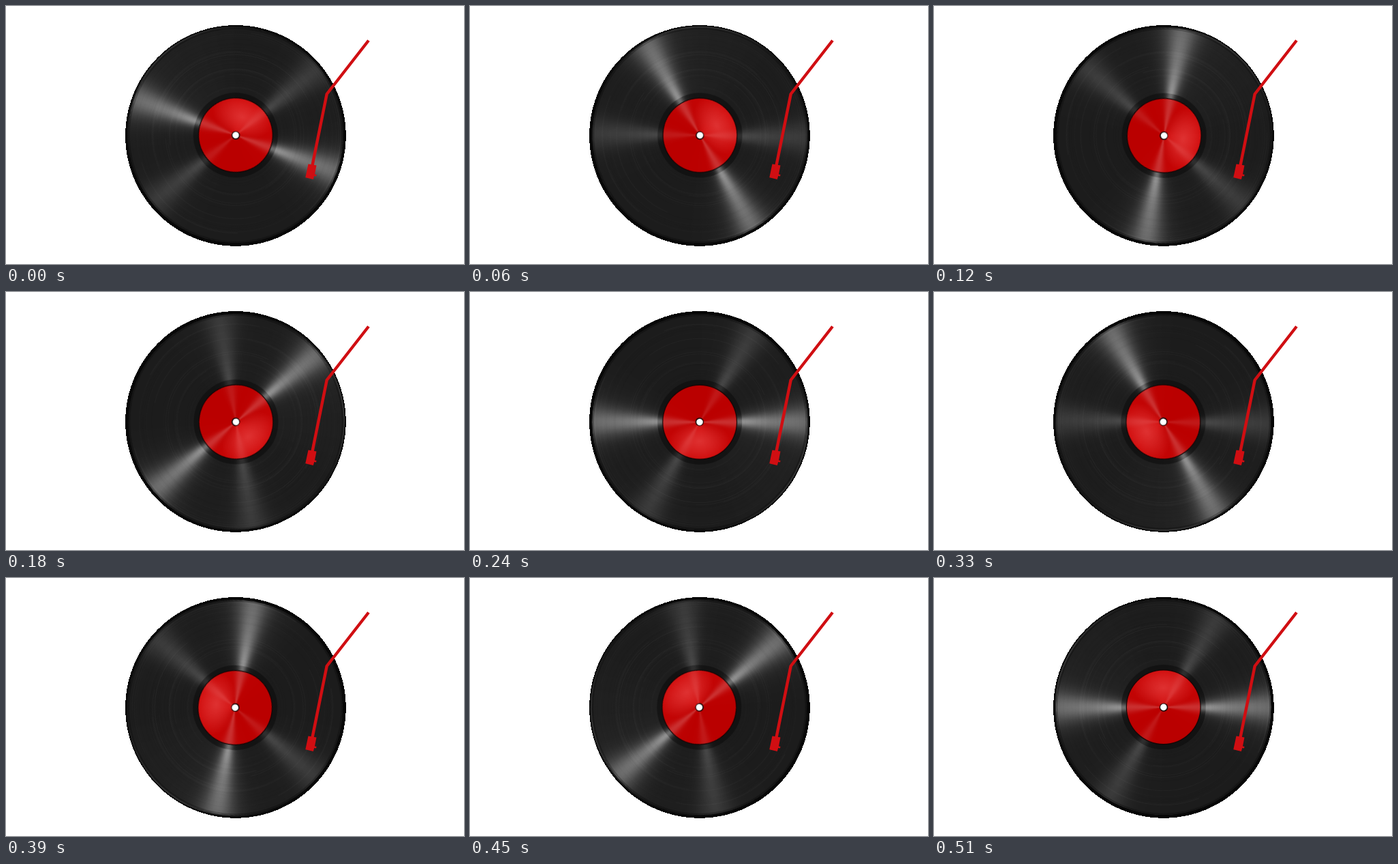
Recreate the animation shown at these times as an HTML page with a canvas. Size 672 px wide and 378 px high, loop 0.54 s.

```html
<!DOCTYPE html>
<html lang="en">
<head>
<meta charset="utf-8">
<title>Spinning record</title>
<style>
  html, body { margin: 0; width: 100%; height: 100%; overflow: hidden; background: #fff; }
  canvas { display: block; width: 672px; height: 378px; }
</style>
</head>
<body>
<canvas id="stage" width="672" height="378"></canvas>
<script>
const W = 672, H = 378, CX = 336.9, CY = 189.9;
const STEP = 30, STEPS = 18;
const ctx = document.getElementById('stage').getContext('2d');
const TAU = Math.PI * 2;

// Angular falloff around c degrees, repeating every period
function glow(a, c, s, period = 180) {
  const d = ((a - c) % period + period * 1.5) % period - period / 2;
  return Math.exp(-(d * d) / (s * s));
}

function conic(g, x, y, color) {
  const grad = g.createConicGradient(0, x, y);
  for (let a = 0; a <= 360; a += 2) grad.addColorStop(a / 360, color(a));
  return grad;
}

function radial(g, x, y, r, stops) {
  const grad = g.createRadialGradient(x, y, 0, x, y, r);
  for (const [p, c] of stops) grad.addColorStop(p, c);
  return grad;
}

function disc(g, x, y, r, fill) {
  g.fillStyle = fill;
  g.beginPath();
  g.arc(x, y, r, 0, TAU);
  g.fill();
}

// Disc with a crisp, stepped edge
function hardDisc(g, x, y, r, fill) {
  g.fillStyle = fill;
  for (let row = Math.floor(y - r); row <= y + r; row++) {
    const half = Math.sqrt(Math.max(0, r * r - (row + .5 - y) ** 2));
    const left = Math.round(x - half);
    g.fillRect(left, row, Math.round(x + half) - left, 1);
  }
}

function ring(g, x, y, r, width, stroke, from = 0, to = TAU) {
  g.strokeStyle = stroke;
  g.lineWidth = width;
  g.beginPath();
  g.arc(x, y, r, from, to);
  g.stroke();
}

function layer() {
  const c = document.createElement('canvas');
  c.width = c.height = 340;
  const g = c.getContext('2d');
  g.translate(170, 170);
  return [c, g];
}

function seeded(seed) {
  return () => (seed = (seed * 16807) % 2147483647) / 2147483647;
}

const vinyl = a => {
  const v = 28 + 64 * glow(a, 0, 9) + 12 * glow(a, 0, 20)
    + 24 * glow(a, -59, 9) + 5 * glow(a, -59, 20) + 4 * glow(a, 215, 35, 360);
  return `rgb(${v},${v},${v})`;
};

const red = a => {
  const top = glow(a, -88, 70, 360);
  const gb = 10 * top + 46 * glow(a, 0, 9) + 24 * glow(a, -59, 9);
  return `rgb(${186 + 20 * top + gb * .25},${gb},${gb})`;
};

function makeShine() {
  const [c, g] = layer();
  disc(g, 0, 0, 157, conic(g, 0, 0, a =>
    `rgba(255,255,255,${.28 * glow(a, 0, 5) + .07 * glow(a, -59, 6)})`));
  g.globalCompositeOperation = 'destination-in';
  disc(g, 0, 0, 168, radial(g, 0, 0, 160, [
    [0, 'rgba(0,0,0,0)'], [.34, '#000'], [.42, '#000'],
    [.62, 'rgba(0,0,0,.45)'], [.9, 'rgba(0,0,0,.15)'], [1, 'rgba(0,0,0,0)']]));
  return c;
}

function makeRecord() {
  const [c, g] = layer();
  const rnd = seeded(77);
  const ox = -.2, oy = -.7;

  disc(g, 0, 0, 160.5, '#060606');
  disc(g, ox, oy, 158, conic(g, ox, oy, vinyl));
  ring(g, ox, oy, 58, 8, 'rgba(8,8,8,.5)');
  g.drawImage(makeShine(), -170, -170);

  // Grooves
  for (let r = 64; r < 156; r += 1.5) {
    const tone = rnd() < .6 ? '0,0,0' : '255,255,255';
    const from = rnd() * TAU;
    ring(g, ox, oy, r, .8, `rgba(${tone},${.01 + rnd() * .045})`, from, from + 1 + rnd() * 3);
  }
  ring(g, ox, oy, 156.4, 1.6, 'rgba(0,0,0,.3)');
  ring(g, ox, oy, 158.8, 1.6, conic(g, ox, oy, a => {
    const v = 8 + 50 * glow(a, 210, 38, 360);
    return `rgb(${v},${v},${v})`;
  }));

  // Label
  disc(g, ox, oy, 55, '#140404');
  disc(g, ox, oy, 53.8, conic(g, ox, oy, red));
  g.save();
  g.beginPath();
  g.arc(ox, oy, 53.8, 0, TAU);
  g.clip();
  g.translate(0, -29);
  g.scale(1.5, 1);
  disc(g, 0, 0, 30, radial(g, 0, 0, 30, [
    [0, 'rgba(255,140,140,.3)'], [.5, 'rgba(255,140,140,.16)'], [1, 'rgba(255,140,140,0)']]));
  g.restore();

  // Spindle hole
  disc(g, .1, -.4, 6.2, '#120202');
  disc(g, -.1, -.6, 4.8, '#fff');
  return c;
}

function drawArm() {
  ctx.strokeStyle = ctx.fillStyle = '#d00e12';
  ctx.lineJoin = 'bevel';
  ctx.lineWidth = 4.4;
  ctx.beginPath();
  ctx.moveTo(532, 50.5);
  ctx.lineTo(470.7, 129);
  ctx.lineTo(449, 236);
  ctx.stroke();
  ctx.fill(new Path2D('M443.5 231.5L455.5 233.5L453 246.5L455.5 247L455 249.5L452.3 249L450.8 254L439.3 251.3Z'));
}

const record = makeRecord();
let last = -1;

function draw(step) {
  ctx.fillStyle = '#fff';
  ctx.fillRect(0, 0, W, H);
  hardDisc(ctx, CX, CY, 161.8, '#060606');
  ctx.save();
  ctx.translate(CX, CY);
  ctx.rotate((step + 1) * TAU / STEPS);
  ctx.drawImage(record, -170, -170);
  ctx.restore();
  drawArm();
}

const start = performance.now();
function tick() {
  const step = Math.floor((performance.now() - start) / STEP) % STEPS;
  if (step !== last) draw(last = step);
  requestAnimationFrame(tick);
}
tick();
</script>
</body>
</html>
```
